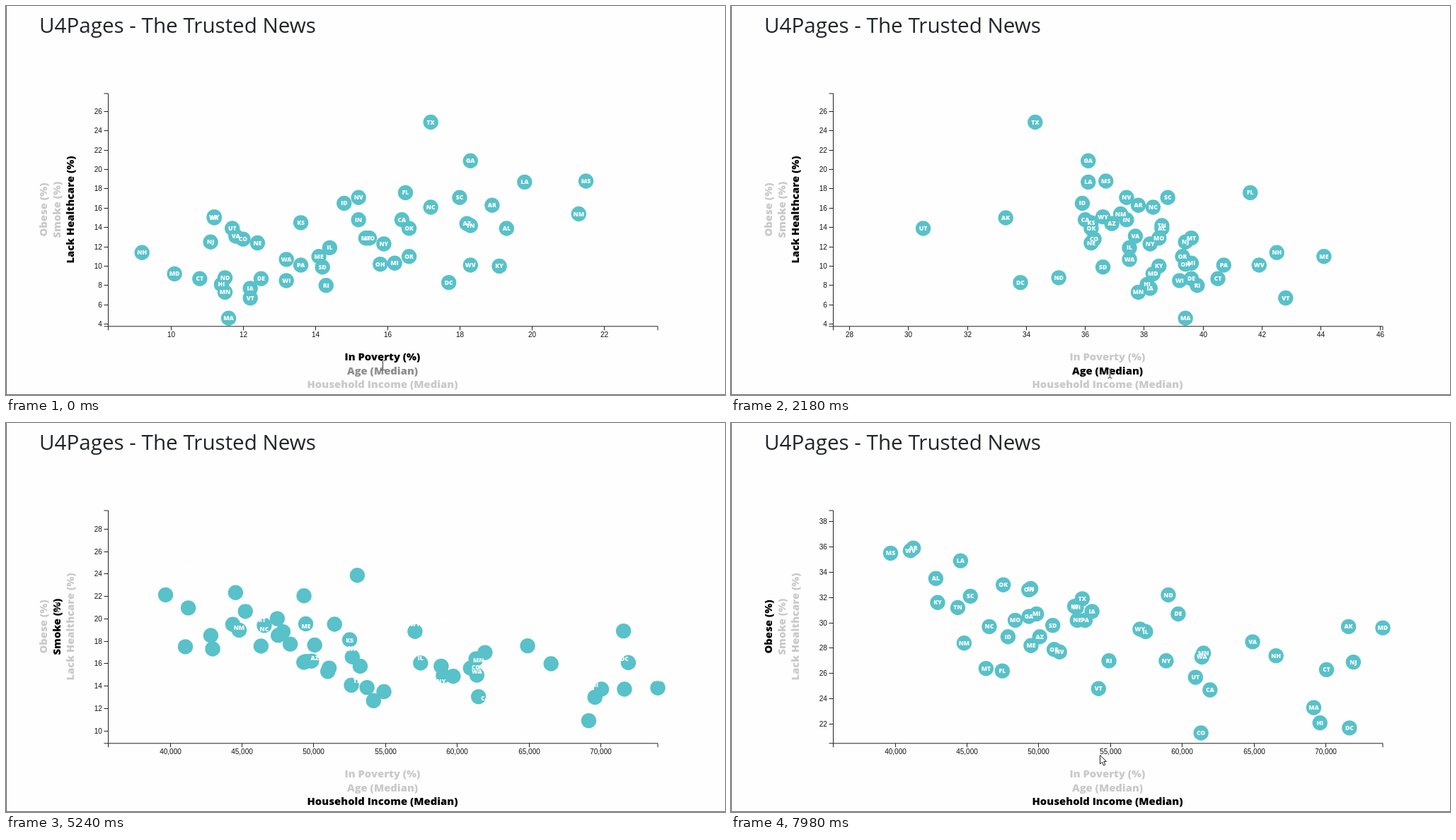
These frames come from a looping animation (1016x551 px, 8 s). An HTML page:

```html
<!DOCTYPE html>
<html lang="en">
<head>
<meta charset="utf-8">
<title>U4Pages</title>
<style>
  html, body { margin: 0; width: 100%; height: 100%; overflow: hidden; background: #fefefe; }
  svg { display: block; }
  .title { font: 500 29.6px "Open Sans", "Noto Sans", sans-serif; fill: #212529; }
  .frame { stroke: #666; fill: none; }
  .axis path { stroke: #222; fill: none; }
  .axis text { font: 10px "Liberation Sans", Arial, sans-serif; fill: #111; }
  .state { fill: #58c1c9; }
  .abbr { font: 800 8.6px "Open Sans", "Noto Sans", sans-serif; fill: #fff; text-anchor: middle; }
  .metric { font: 800 14.8px "Open Sans", "Noto Sans", sans-serif; fill: #c9c9c9; text-anchor: middle; }
  .metric.hover { fill: #8e8e8e; }
  .metric.active { fill: #000; }
</style>
</head>
<body>
<svg id="stage" width="1016" height="551" viewBox="0 0 1016 551">
  <path class="frame" d="M.5 0V550.5H1016"/>
  <text class="title" x="47" y="37.5">U4Pages - The Trusted News</text>
  <g id="xAxis" class="axis" text-anchor="middle"></g>
  <g id="yAxis" class="axis" text-anchor="end"></g>
  <g id="circles"></g>
  <g id="abbrs"></g>
  <g id="metrics"></g>
  <g id="beam" fill="none">
    <path stroke="#fff" stroke-opacity=".6" stroke-width="2.4" d="M0-6V6"/>
    <path stroke="#333" d="M-3-6.5H-1L0-5.5L1-6.5H3M0-5.5V5.5M-3 6.5H-1L0 5.5L1 6.5H3"/>
  </g>
  <path id="arrow" fill="#fff" stroke="#222" d="M.5.5V13L3.5 10.3L5.5 15L7.8 14L5.8 9.5H9.5Z"/>
</svg>
<script>
const LOOP = 8000;
const LEFT = 144.5, RIGHT = 921, TOP = 124, BOTTOM = 453.8;

const states = ("AL AK AZ AR CA CO CT DE DC FL GA HI ID IL IN IA KS KY LA ME MD MA MI MN MS MO MT " +
  "NE NV NH NJ NM NY NC ND OH OK OR PA RI SC SD TN TX UT VT VA WA WV WI WY").split(" ");

// ticks: [first, last, step]; range: pixel positions of the first and last tick
const metrics = {
  poverty: {
    label: "In Poverty (%)", at: 502, ticks: [10, 22, 2], range: [233, 845],
    data: [19.3, 11.2, 18.2, 18.9, 16.4, 12, 10.8, 12.5, 17.7, 16.5, 18.3, 11.4, 14.8, 14.4, 15.2, 12.2, 13.6,
      19.1, 19.8, 14.1, 10.1, 11.6, 16.2, 11.5, 21.5, 15.5, 15.4, 12.4, 15.2, 9.2, 11.1, 21.3, 15.9, 17.2,
      11.5, 15.8, 16.6, 16.6, 13.6, 14.3, 18, 14.2, 18.3, 17.2, 11.7, 12.2, 11.8, 13.2, 18.3, 13.2, 11.2]
  },
  age: {
    label: "Age (Median)", at: 521.5, ticks: [28, 46, 2], range: [167.5, 917],
    data: [38.6, 33.3, 36.9, 37.8, 36, 36.3, 40.5, 39.6, 33.8, 41.6, 36.1, 38.1, 35.9, 37.5, 37.4, 38.2, 36.2,
      38.5, 36.1, 44.1, 38.3, 39.4, 39.6, 37.8, 36.7, 38.5, 39.6, 36.2, 37.4, 42.5, 39.4, 37.2, 38.2, 38.3,
      35.1, 39.4, 36.2, 39.3, 40.7, 39.8, 38.8, 36.6, 38.6, 34.3, 30.5, 42.8, 37.7, 37.5, 41.9, 39.2, 36.6]
  },
  income: {
    label: "Household Income (Median)", at: 541, ticks: [40000, 70000, 5000], range: [232, 840.5],
    data: [42830, 71583, 50068, 41262, 61933, 61303, 70048, 59716, 71648, 47463, 49321, 69592, 47861, 57444,
      49446, 53712, 52504, 42958, 44555, 49462, 73971, 69160, 49847, 61481, 39680, 48363, 46328, 52686, 51450,
      66532, 71919, 44803, 58878, 46556, 59029, 49308, 47529, 51075, 53234, 54891, 45238, 50979, 44361, 53035,
      60922, 54166, 64902, 61366, 41059, 52622, 57055]
  },
  healthcare: {
    label: "Lack Healthcare (%)", at: 96, ticks: [4, 26, 2], range: [450.5, 149.5],
    data: [13.9, 15, 14.4, 16.3, 14.8, 12.8, 8.7, 8.7, 8.3, 17.6, 20.9, 8.1, 16.5, 11.9, 14.8, 7.7, 14.5,
      10, 18.7, 11, 9.2, 4.6, 10.3, 7.3, 18.8, 12.9, 12.9, 12.4, 17.1, 11.4, 12.5, 15.4, 12.3, 16.1,
      8.8, 10.2, 13.9, 11, 10.1, 8, 17.1, 9.9, 14.2, 24.9, 13.9, 6.7, 13.1, 10.7, 10.1, 8.5, 15.1]
  },
  smokes: {
    label: "Smoke (%)", at: 77, ticks: [10, 28, 2], range: [436, 150.5],
    data: [21.1, 19.9, 16.5, 24.7, 12.9, 15.7, 15.4, 19.9, 16.4, 17.7, 17.4, 14.1, 15.9, 16.5, 22.9, 18.5, 18.1,
      26.2, 24, 19.3, 14.6, 14.7, 21.2, 16.3, 23, 20.6, 19.9, 17.4, 17, 17.5, 15.1, 19.2, 14.4, 19.1,
      19.9, 21, 21.1, 17, 19.9, 16.3, 21.5, 18.6, 24.2, 14.5, 9.7, 16.4, 19.5, 15.3, 26.7, 17.3, 19.5]
  },
  obesity: {
    label: "Obese (%)", at: 58, ticks: [22, 38, 2], range: [426.5, 139.5],
    data: [33.5, 29.7, 28.9, 35.9, 24.7, 21.3, 26.3, 30.7, 21.7, 26.2, 30.5, 22.1, 28.9, 29.3, 32.7, 30.9, 31.3,
      31.6, 34.9, 28.2, 29.6, 23.3, 30.7, 27.6, 35.5, 30.2, 26.4, 30.2, 27.7, 27.4, 26.9, 28.4, 27, 29.7,
      32.2, 32.6, 33, 27.9, 30.2, 27, 32.1, 29.8, 31.2, 31.9, 25.7, 24.8, 28.5, 27.3, 35.7, 31.2, 29.5]
  }
};

// Each click starts a move sampled every `step` ms; `lead` is the progress at the first sample.
const xMoves = [
  { start: 0, to: "poverty", step: 140, lead: 1 },
  { start: 1370, to: "age", step: 135, lead: 0.03 },
  { start: 3540, to: "income", step: 142, lead: 0.218 }
];
const yMoves = [
  { start: 0, to: "healthcare", step: 140, lead: 1 },
  { start: 4970, to: "smokes", step: 142, lead: 0.2 },
  { start: 6920, to: "obesity", step: 130, lead: 0.1 }
];
const hovers = [
  ["age", 0, 1370], ["income", 2330, 3540], ["smokes", 4690, 4970], ["obesity", 6490, 6920]
];
// [time, x, y, isArrow]
const pointer = [
  [0, 532.5, 509], [150, 532.5, 511], [290, 532.5, 513.5], [2180, 535.5, 520.5], [2330, 536.5, 527],
  [2450, 536.5, 529.5], [2590, 536.5, 532], [2730, 537, 534.5], [2870, 537.5, 536.5],
  [3830, 410, 420, true], [3970, 210, 320, true], [4110, 98, 249], [4390, 91.5, 252], [4540, 80, 257],
  [4690, 72.5, 261], [6190, 69, 261], [6340, 61, 262], [6490, 54, 262],
  [7310, 150, 300, true], [7440, 370, 380, true], [7570, 520, 423, true], [7850, 520.5, 452, true],
  [7980, 521, 470, true]
];

const byId = id => document.getElementById(id);

function add(parent, tag, attrs, text) {
  const node = document.createElementNS("http://www.w3.org/2000/svg", tag);
  setAttrs(node, attrs);
  if (text !== undefined) node.textContent = text;
  return parent.appendChild(node);
}

function setAttrs(node, attrs) {
  for (const key in attrs) node.setAttribute(key, attrs[key]);
}

function scale({ ticks: [a, b], range: [p, q] }, value) {
  return p + (value - a) / (b - a) * (q - p);
}

const easeCubic = t => t < 0.5 ? 4 * t ** 3 : 1 - 4 * (1 - t) ** 3;

function latest(list, time, timeOf) {
  let i = list.length - 1;
  while (i > 0 && timeOf(list[i]) > time) i--;
  return i;
}

function moveAt(moves, time) {
  const i = latest(moves, time, m => m.start);
  const { to, start, step, lead } = moves[i];
  const from = moves[Math.max(0, i - 1)].to;
  const progress = Math.min(1, lead + 0.2 * Math.floor((time - start) / step));
  return { from, to, eased: easeCubic(progress) };
}

function position({ from, to, eased }, i) {
  const a = scale(metrics[from], metrics[from].data[i]);
  const b = scale(metrics[to], metrics[to].data[i]);
  return a + (b - a) * eased;
}

function drawAxis(group, name, horizontal) {
  if (group.dataset.name === name) return;
  group.dataset.name = name;
  group.replaceChildren();
  const metric = metrics[name];
  const [first, last, step] = metric.ticks;
  let d = horizontal
    ? `M${LEFT} ${BOTTOM + 5.5}V${BOTTOM}H${RIGHT}V${BOTTOM + 5.5}`
    : `M${LEFT - 6} ${TOP}H${LEFT}V${BOTTOM}H${LEFT - 6}`;
  for (let v = first; v <= last; v += step) {
    const p = Math.floor(scale(metric, v)) + 0.5;
    d += horizontal ? `M${p} ${BOTTOM}v5.5` : `M${LEFT} ${p}h-6`;
    const at = horizontal ? { x: p, y: 468.8 } : { x: 135.8, y: p + 3.3 };
    add(group, "text", at, v.toLocaleString("en-US"));
  }
  add(group, "path", { d });
}

const circles = states.map(() => add(byId("circles"), "circle", { class: "state", r: 10.7 }));
const abbrs = states.map(s => add(byId("abbrs"), "text", { class: "abbr" }, s));
const labels = Object.entries(metrics).map(([name, { label, at }], i) => {
  const transform = i < 3 ? `translate(532 ${at})` : `translate(${at} 288.5) rotate(-90)`;
  return { name, node: add(byId("metrics"), "text", { transform }, label) };
});

function drawPointer(time) {
  const [, x, y, isArrow] = pointer[latest(pointer, time, p => p[0])];
  setAttrs(byId("arrow"), { visibility: isArrow ? "visible" : "hidden", transform: `translate(${x} ${y})` });
  setAttrs(byId("beam"), { visibility: isArrow ? "hidden" : "visible", transform: `translate(${x} ${y})` });
}

function render(time) {
  const x = moveAt(xMoves, time), y = moveAt(yMoves, time);
  drawAxis(byId("xAxis"), x.to, true);
  drawAxis(byId("yAxis"), y.to, false);
  states.forEach((_, i) => {
    setAttrs(circles[i], { cx: position(x, i), cy: position(y, i) });
    // Labels jump straight to the new place while circles glide.
    setAttrs(abbrs[i], {
      x: position({ ...x, eased: 1 }, i),
      y: position({ ...y, eased: 1 }, i) + 3
    });
  });
  for (const { name, node } of labels) {
    const active = name === x.to || name === y.to;
    const hover = hovers.some(([n, from, to]) => n === name && time >= from && time < to);
    node.setAttribute("class", "metric" + (active ? " active" : hover ? " hover" : ""));
  }
  drawPointer(time);
}

const begin = performance.now();
function tick() {
  render((performance.now() - begin) % LOOP);
  requestAnimationFrame(tick);
}
tick();
</script>
</body>
</html>
```
